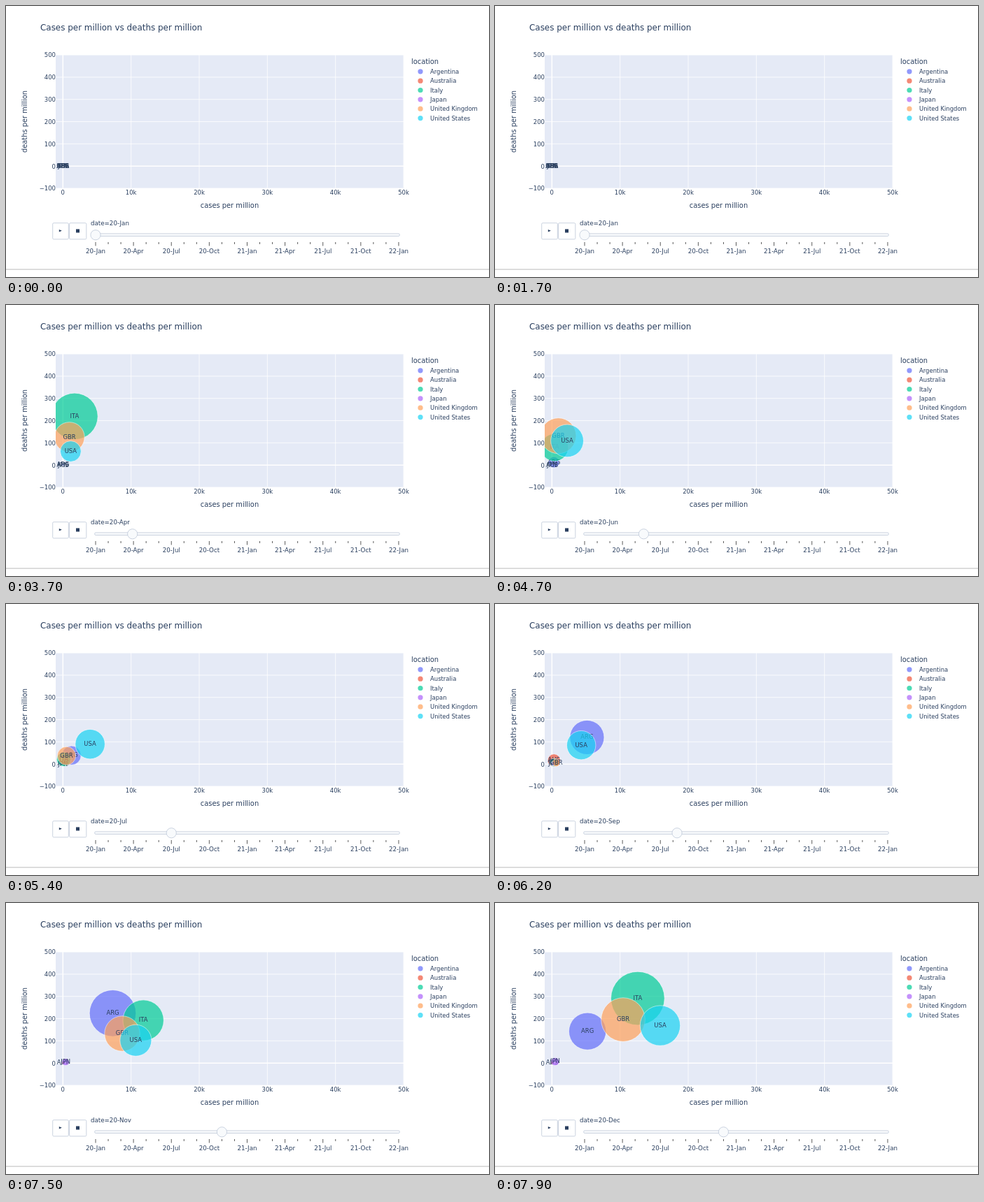
These frames come from a looping animation (690x388 px, 8 s). An HTML page:

```html
<!DOCTYPE html>
<html lang="en">
<head>
<meta charset="utf-8">
<title>Cases per million vs deaths per million</title>
<style>
  html, body { margin: 0; width: 100%; height: 100%; overflow: hidden; background: #fff; }
  svg { display: block; font: 8.46px "DejaVu Sans", sans-serif; fill: #2a3f5f; }
</style>
</head>
<body>
<svg id="chart" width="690" height="388" viewBox="0 0 690 388">
  <clipPath id="area"><rect x="71" y="70" width="497" height="191"/></clipPath>
</svg>
<script>
const LOOP = 8000, START = 2009, STEP = 518, MOVE = 500, KNOB_MOVE = 150;
const MONTHS = 'Jan Feb Mar Apr May Jun Jul Aug Sep Oct Nov Dec'.split(' ');
const chart = document.getElementById('chart');

// Turning points of each curve: [month, cases per million, deaths per million].
const countries = [
  { name: 'Argentina', code: 'ARG', fill: '#636efa',
    turns: [[3, 74, 4], [7, 4970, 113], [9, 9400, 310], [11, 3900, 96]] },
  { name: 'Australia', code: 'AUS', fill: '#ef553b',
    turns: [[5, 28, 0], [7, 330, 18], [9, 20, 1]] },
  { name: 'Italy', code: 'ITA', fill: '#00cc96',
    turns: [[2, 1733, 205], [3, 1650, 257], [5, 125, 32], [7, 200, 6], [9, 6040, 45], [10, 15270, 281], [11, 8370, 307]] },
  { name: 'Japan', code: 'JPN', fill: '#ab63fa',
    turns: [[7, 200, 2], [11, 550, 8]] },
  { name: 'United Kingdom', code: 'GBR', fill: '#ffa15a',
    turns: [[2, 570, 36], [3, 1980, 360], [5, 550, 62], [7, 490, 5], [9, 8150, 62], [10, 9030, 175], [11, 12680, 227]] },
  { name: 'United States', code: 'USA', fill: '#19d3f3',
    turns: [[2, 570, 16], [3, 2640, 182], [5, 2000, 76], [6, 5500, 100], [8, 3500, 74], [9, 5860, 72], [10, 13600, 120], [11, 19500, 245]] }
];

const px = cases => 81.3 + cases * .009735;
const py = deaths => 229.2 - deaths * .3183;
const radius = deaths => 2.25 * Math.sqrt(deaths);
const knobX = month => 128 + month * 18.04;
const mix = (a, b, p) => a + (b - a) * p;

// Zero before the first turning point, then exponential growth or decay between them.
function monthly(turns, month) {
  if (month < turns[0][0]) return [0, 0];
  const i = turns.findIndex(turn => turn[0] >= month);
  if (i < 1) return turns.at(i).slice(1);
  const [a, b] = [turns[i - 1], turns[i]];
  const p = (month - a[0]) / (b[0] - a[0]);
  return [1, 2].map(k => Math.expm1(mix(Math.log1p(a[k]), Math.log1p(b[k]), p)));
}

function set(el, attrs) {
  for (const key in attrs) el.setAttribute(key, attrs[key]);
}
function add(tag, attrs, parent = chart) {
  const el = document.createElementNS('http://www.w3.org/2000/svg', tag);
  set(el, attrs);
  return parent.appendChild(el);
}
function text(str, x, y, anchor = 'start', size = 8.46, parent = chart) {
  const el = add('text', { x, y, 'text-anchor': anchor, 'font-size': size }, parent);
  el.textContent = str;
  return el;
}
function line(x1, y1, x2, y2, stroke, width) {
  add('line', { x1, y1, x2, y2, stroke, 'stroke-width': width });
}

// Plot area, grid and axes
text('Cases per million vs deaths per million', 49, 35, 'start', 11.94);
add('rect', { x: 71, y: 70, width: 497, height: 191, fill: '#e5eaf6' });
for (let i = 0; i <= 5; i++) {
  const x = px(i * 10000);
  line(x, 70, x, 261, '#fff', i ? .8 : 1.5);
  text(i ? i * 10 + 'k' : '0', x, 270, 'middle');
}
for (let d = -100; d <= 500; d += 100) {
  line(71, py(d), 568, py(d), '#fff', d ? .8 : 1.5);
  text(String(d).replace('-', '−'), 71, py(d) + 3.4, 'end');
}
text('cases per million', 319.5, 289.3, 'middle', 9.87);
set(text('deaths per million', 0, 0, 'middle', 9.87), { transform: 'translate(30 165.5) rotate(-90)' });

// Legend and bubbles
text('location', 579, 83, 'start', 9.87);
const plot = add('g', { 'clip-path': 'url(#area)' });
const bubbles = countries.map(({ name, code, fill, turns }, i) => {
  const y = 93.8 + i * 13.35;
  add('circle', { cx: 592, cy: y, r: 3.6, fill, opacity: .7 });
  text(name, 606, y + 3.1);
  return {
    turns,
    dot: add('circle', { fill, stroke: '#fff', 'stroke-width': .7, opacity: .7 }, plot),
    label: text(code, 0, 0, 'middle', 8.46, plot)
  };
});

// Buttons and slider
const edge = { fill: '#fff', stroke: '#bec8d9', 'stroke-width': .8, rx: 1.5 };
add('rect', { x: 66.7, y: 310.7, width: 22.6, height: 23.2, ...edge });
add('rect', { x: 90.5, y: 310.7, width: 24.3, height: 23.2, ...edge });
add('path', { d: 'M75.8 320l4 1.8-4 1.8z' });
add('rect', { x: 100, y: 319.5, width: 5, height: 5 });
const dateLabel = text('', 121, 314, 'start', 8.7);
add('rect', { x: 126.7, y: 325.9, width: 435.6, height: 3.6, ...edge, fill: '#f8fafc' });
for (let m = 0; m <= 24; m++) {
  const x = knobX(m), major = m % 3 === 0;
  line(x, 338, x, major ? 343.5 : 341, '#333', .8);
  if (major) text(`${20 + Math.floor(m / 12)}-${MONTHS[m % 12]}`, x, 354.2, 'middle', 8.7);
}
const knob = add('circle', { cy: 327.8, r: 7.1, fill: '#f8fafc', stroke: '#bec8d9', 'stroke-width': .8 });
line(0, 377.2, 690, 377.2, '#c8c8c8', 1.2);

function draw(t) {
  const month = Math.max(0, Math.floor((t - START) / STEP));
  const last = Math.max(0, month - 1);
  const elapsed = Math.max(0, t - START - month * STEP);
  const p = Math.min(1, elapsed / MOVE);

  for (const { turns, dot, label } of bubbles) {
    const [c0, d0] = monthly(turns, last), [c1, d1] = monthly(turns, month);
    const x = px(mix(c0, c1, p)), y = py(mix(d0, d1, p));
    set(dot, { cx: x, cy: y, r: mix(radius(d0), radius(d1), p) });
    set(label, { x, y: y + 2.4 });
  }
  set(knob, { cx: knobX(mix(last, month, Math.min(1, elapsed / KNOB_MOVE))) });
  dateLabel.textContent = 'date=20-' + MONTHS[month];
}

const begin = performance.now();
function tick() {
  draw((performance.now() - begin) % LOOP);
  requestAnimationFrame(tick);
}
tick();
</script>
</body>
</html>
```
